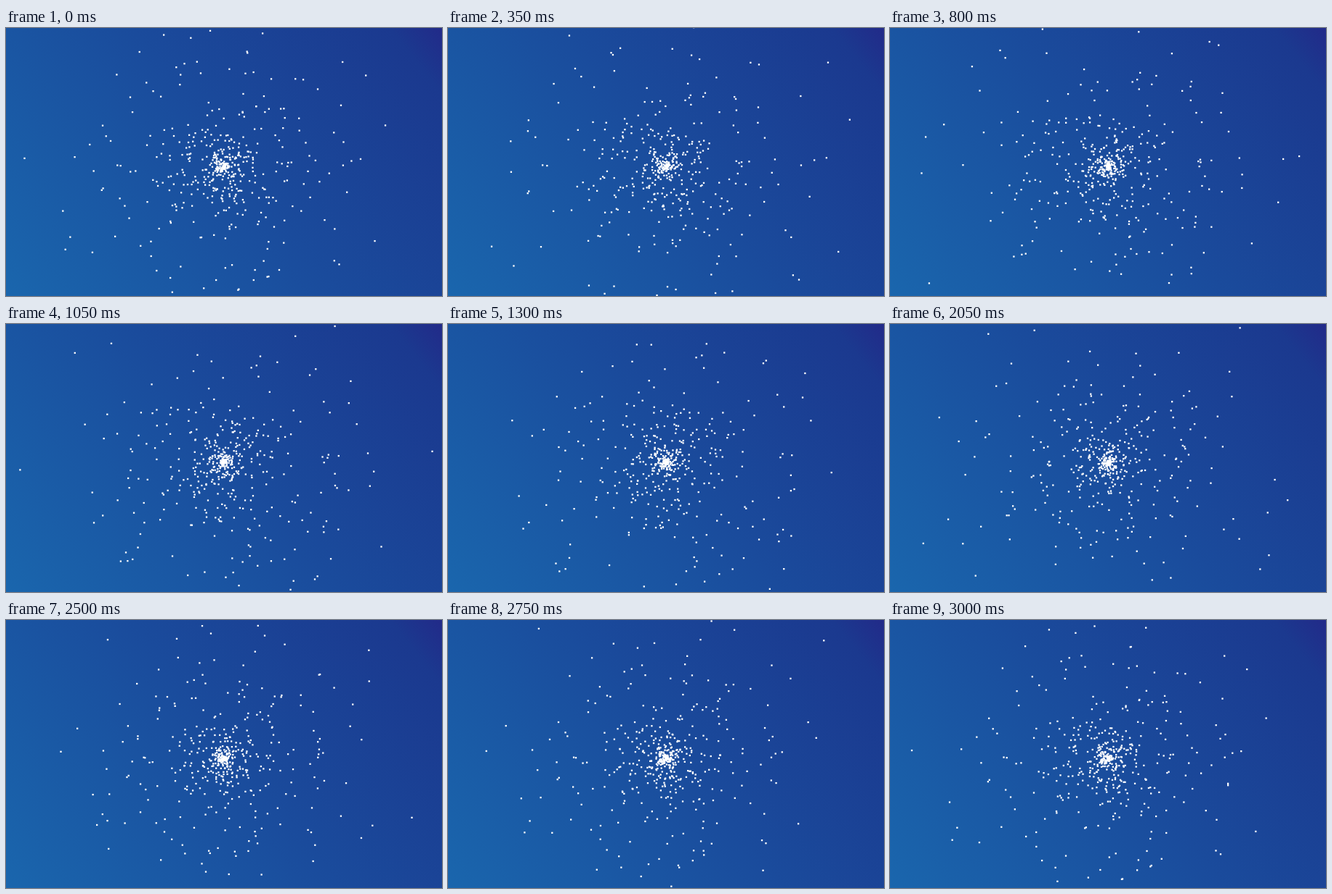
Animation, 600 px wide and 370 px high, one loop 3.05 s. Source, as an HTML page with a canvas:

```html
<!DOCTYPE html>
<html lang="en">
<head>
<meta charset="utf-8">
<title>Particle burst</title>
<style>
  html, body { margin: 0; width: 100%; height: 100%; overflow: hidden; }
  body { background: linear-gradient(52deg, #1a66ad, #1a4b9c 52%, #1b398f 92%, #222a89); }
  canvas { display: block; }
</style>
</head>
<body>
<canvas id="stage" width="600" height="370"></canvas>
<script>
const ctx = document.getElementById('stage').getContext('2d');
const CENTER = { x: 301, y: 190.5 };
const LOOP = 3050, STEP = 50;
const COUNT = 490, MAX_SPEED = 0.098; // px per ms
const DOT = 2.3;

function seededRandom(seed) {
  return () => {
    seed = (seed + 0x6D2B79F5) | 0;
    let n = Math.imul(seed ^ (seed >>> 15), 1 | seed);
    n = (n + Math.imul(n ^ (n >>> 7), 61 | n)) ^ n;
    return ((n ^ (n >>> 14)) >>> 0) / 4294967296;
  };
}

const random = seededRandom(29);

// Each particle leaves the centre at a steady speed and is reborn after one loop
const particles = Array.from({ length: COUNT }, () => {
  const angle = random() * Math.PI * 2;
  const speed = MAX_SPEED * random() ** 1.3;
  return {
    vx: Math.cos(angle) * speed,
    vy: Math.sin(angle) * speed,
    startAge: random() * LOOP
  };
});

function draw(t) {
  ctx.clearRect(0, 0, 600, 370);
  ctx.fillStyle = '#fff';
  for (const { vx, vy, startAge } of particles) {
    const age = (startAge + t) % LOOP;
    const x = CENTER.x + vx * age;
    const y = CENTER.y + vy * age;
    ctx.fillRect(x - DOT / 2, y - DOT / 2, DOT, DOT);
  }
}

const start = performance.now();
function tick() {
  const t = (performance.now() - start) % LOOP;
  draw(Math.floor(t / STEP) * STEP);
  requestAnimationFrame(tick);
}
tick();
</script>
</body>
</html>
```
